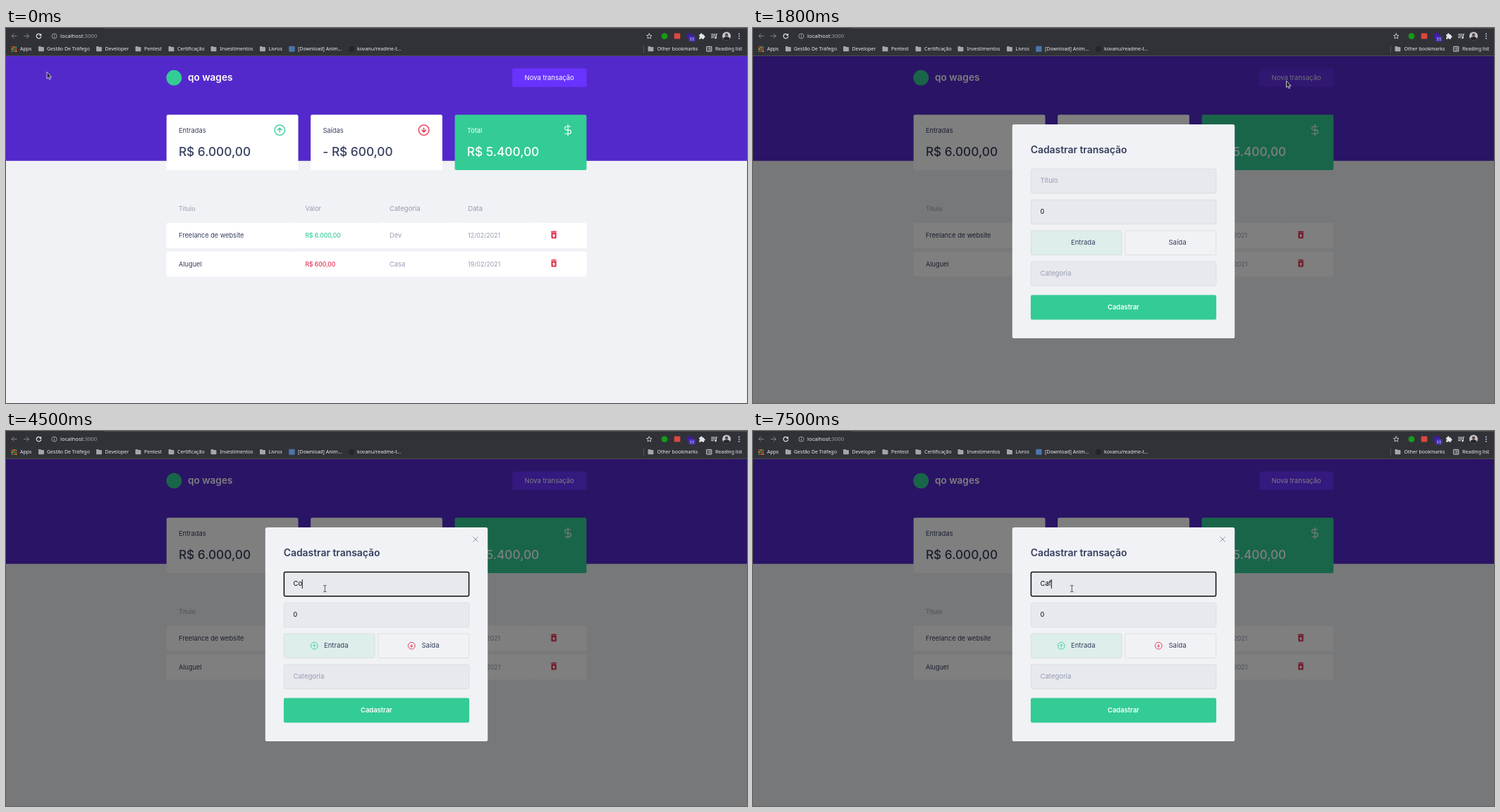
Write an HTML page that moves like this. It is 1051 px wide and 533 px high and loops after 8000 ms.

```html
<!DOCTYPE html>
<html lang="pt-BR">
<head>
<meta charset="utf-8">
<title>Finanças</title>
<style>
  html, body { margin: 0; width: 100%; height: 100%; overflow: hidden; background: #f0f2f5; }
  svg { display: block; width: 100vw; height: 100vh; font-family: Inter, sans-serif; }
  text { white-space: pre; }
  .chrome { font-family: "Noto Sans", sans-serif; }
  .line { fill: none; stroke-linecap: round; stroke-linejoin: round; }
</style>
</head>
<body>
<svg id="stage" viewBox="0 0 1051 533"></svg>
<script>
const PURPLE = '#5429cc', GREEN = '#33cc95', RED = '#e52e4d';
const TITLE = '#363f5f', MUTED = '#969cb3', PAPER = '#f0f2f5', ICON = '#e4e5e8';

const text = (x, y, size, fill, str, extra = '') =>
  `<text x="${x}" y="${y}" font-size="${size}" fill="${fill}" ${extra}>${str}</text>`;
const rect = (x, y, w, h, fill, r = 0, extra = '') =>
  `<rect x="${x}" y="${y}" width="${w}" height="${h}" rx="${r}" fill="${fill}" ${extra}/>`;
const circle = (x, y, r, fill, extra = '') =>
  `<circle cx="${x}" cy="${y}" r="${r}" fill="${fill}" ${extra}/>`;
const line = (d, stroke, width = 1, extra = '') =>
  `<path class="line" d="${d}" stroke="${stroke}" stroke-width="${width}" ${extra}/>`;
const group = (id, body, extra = '') => `<g id="${id}" ${extra}>${body}</g>`;

const SEMI = 'font-weight="600"', MEDIUM = 'font-weight="500"';

function arrowCircle(x, y, r, color, down) {
  const turn = down ? 180 : 0, k = r / 7.3;
  return `<g transform="translate(${x} ${y}) rotate(${turn}) scale(${k})">` +
    circle(0, 0, 7.3, 'none', `stroke="${color}" stroke-width="1.35"`) +
    line('M0 2.9V-2.9M-2.9 0L0 -2.9 2.9 0', color, 1.35) + '</g>';
}

const folder = (x) =>
  `<path d="M${x} 27q0-.9.9-.9h2.2l1 1h3q.8 0 .8.9v4.5q0 .8-.8.8h-6.2q-.9 0-.9-.8z" fill="#a4a6ab"/>`;

function toolbar() {
  const label = (x, str) => text(x, 32.4, 7, '#e8eaed', str);
  const folders = [
    [46, 58, 'Gestão De Tráfego'], [128, 140.5, 'Developer'], [183.5, 196, 'Pentest'],
    [230.5, 243, 'Certificação'], [290.5, 303.5, 'Investimentos'], [360, 372.5, 'Livros'],
    [910.5, 923.5, 'Other bookmarks'],
  ].map(([x, tx, str]) => folder(x) + label(tx, str)).join('');

  const appColors = ['#ea4335', '#f5a623', '#34a853'];
  let apps = '';
  for (let i = 0; i < 9; i++)
    apps += rect(7.7 + (i % 3) * 2.8, 26.3 + Math.floor(i / 3) * 2.8, 1.9, 1.9, appColors[(i + Math.floor(i / 3)) % 3]);

  return group('toolbar',
    rect(0, 0, 1051, 40, '#313238') + rect(139, 0, 912, 1, '#4b4c51') +
    rect(0, 39, 1051, 1, '#4b4c51') +
    line('M15 11.5H8.3M11.3 8.3L8.1 11.5l3.2 3.2M25.7 11.5h6.7M29.4 8.3l3.2 3.2-3.2 3.2', '#85878c', .95) +
    line('M49.2 9.6a3.3 3.3 0 1 0 .6 2.6', ICON, 1.2) +
    '<path d="M50.2 7.7v3.4h-3.4z" fill="#e4e5e8"/>' +
    circle(68.5, 11.6, 3.5, 'none', 'stroke="#b4b6ba" stroke-width=".8"') +
    line('M68.5 11.3v2M68.5 9.7v.1', '#b4b6ba', .8) +
    text(77, 14.3, 7.7, '#e8eaed', 'localhost<tspan fill="#9aa0a6">:3000</tspan>') +
    line('M912.3 7.9l1.1 2.4 2.6.3-2 1.8.6 2.6-2.3-1.3-2.3 1.3.6-2.6-2-1.8 2.6-.3z', ICON, .8) +
    circle(934, 11.7, 4.4, '#189a18') +
    rect(947.7, 7.6, 8.6, 8, '#d9483f', 1) +
    rect(965.5, 7.5, 8, 7.5, '#3d1d9c', 1) + rect(968.5, 11.5, 9, 7.7, '#4a33b8', 1.2) +
    text(973, 17.8, 6, '#fff', '11', 'text-anchor="middle"') +
    rect(983, 9.2, 7, 6.6, ICON, .8) + circle(986.2, 8.8, 1.4, ICON) + circle(990.1, 12.4, 1.4, ICON) +
    circle(983.2, 12.6, 1.1, '#313238') + circle(986.4, 15.7, 1.1, '#313238') +
    line('M1000.5 9h5.5M1000.5 11.3h5.5M1000.5 13.6h3M1007.3 14V8.8h1.4', ICON, 1) + circle(1006.3, 14, 1.2, ICON) +
    circle(1022, 11.6, 6, '#c8c9cc') +
    '<path d="M1017.2 15.2q1-3 4.8-3t4.8 3a6 6 0 0 1-9.6 0z" fill="#23242a"/>' + circle(1022, 9.7, 2.3, '#5c4a45') +
    [8.4, 11.6, 14.8].map(y => circle(1039.8, y, .9, ICON)).join('') +
    apps + label(20, 'Apps') + folders +
    rect(401.2, 25.7, 8.4, 8, '#4a76a8', 1) + label(414, '[Download] Anim...') +
    circle(490, 29.8, 4.1, '#24262b') + label(498, 'kovanu/readme-t...') +
    rect(904, 25, .8, 10, '#5b5d62') +
    rect(993.6, 26.4, 7.2, 6.8, 'none', .5, 'stroke="#e4e5e8" stroke-width=".9"') +
    line('M995.4 28.2h.1M995.4 29.8h.1M995.4 31.4h.1M997 28.2h2.3M997 29.8h2.3M997 31.4h2.3', ICON, .7) +
    label(1006, 'Reading list'),
    'class="chrome"');
}

function card(x, label, value, fill, ink) {
  return rect(x, 123.2, 186.8, 78.8, fill, 2.2) +
    text(x + 17.3, 148.5, 9.3, ink, label) +
    text(x + 17.2, 181.8, 17.3, ink, value, MEDIUM);
}

function row(y, name, amount, color, kind, date) {
  const edges = [227.5, 407, 526, 638, 751, 823.5];
  const cells = edges.slice(1).map((end, i) => rect(edges[i], y, end - edges[i], 36, '#fff', 2.2)).join('');
  const base = y + 21.3;
  return cells + text(245, base, 9.2, TITLE, name) + text(424.6, base, 8.5, color, amount, MEDIUM) +
    text(544, base, 9.3, MUTED, kind) + text(655.3, base, 8.75, MUTED, date) +
    `<path transform="translate(769.8 ${y + 9.6}) scale(.6)" fill="${RED}" d="M19 4h-3.5l-1-1h-5l-1 1H5v2h14zM6 7v12c0 1.1.9 2 2 2h8c1.1 0 2-.9 2-2V7zM14 14v4h-4v-4H8l4-4 4 4z"/>`;
}

function page() {
  return rect(0, 40, 1051, 493, PAPER) + rect(0, 40, 1051, 148.8, PURPLE) +
    circle(238.3, 70.7, 10.9, GREEN) + text(258, 75.2, 13.6, '#fff', 'qo wages', SEMI) +
    group('button', rect(718.2, 57.5, 105.3, 26.3, '#6933ff', 2.2) + text(735.6, 74, 9.45, '#fff', 'Nova transação')) +
    card(227.7, 'Entradas', 'R$ 6.000,00', '#fff', TITLE) + arrowCircle(388.2, 145.1, 7.3, GREEN) +
    card(432.1, 'Saídas', '- R$ 600,00', '#fff', TITLE) + arrowCircle(592.7, 145.1, 7.3, RED, true) +
    card(636.6, 'Total', 'R$ 5.400,00', GREEN, '#fff') +
    line('M12 1v22M17 5H9.5a3.5 3.5 0 0 0 0 7h5a3.5 3.5 0 0 1 0 7H6', '#fff', 1.5,
      'transform="translate(788.3 136.4) scale(.73)"') +
    text(245, 259.8, 8.9, MUTED, 'Título') + text(424.6, 259.8, 9.3, MUTED, 'Valor') +
    text(544, 259.8, 9.5, MUTED, 'Categoria') + text(655.3, 259.8, 9.6, MUTED, 'Data') +
    row(277, 'Freelance de website', 'R$ 6.000,00', GREEN, 'Dev', '12/02/2021') +
    row(317.4, 'Aluguel', 'R$ 600,00', RED, 'Casa', '19/02/2021');
}

function modal() {
  const border = 'stroke="#d7d7d7" stroke-width=".7"';
  const field = (y) => rect(394.3, y + .3, 262.6, 34.5, '#e7e9ee', 2.2, border);
  return group('modal',
    rect(0, 40, 1051, 493, '#000', 0, 'opacity=".5"') +
    rect(367.8, 137, 315.4, 304, PAPER, 2.6) +
    text(393.7, 177.7, 13.9, TITLE, 'Cadastrar transação', SEMI) +
    field(200) + field(244) + field(331.6) +
    rect(394.3, 288, 128.8, 34.6, '#ddeeeb', 2.2, border) + rect(527.8, 288, 129, 34.6, 'none', 2.2, border) +
    text(407.6, 264.3, 9, '#000', '0') +
    text(451, 308.1, 9.5, TITLE, 'Entrada') + text(589.4, 308.1, 9.6, TITLE, 'Saída') +
    text(407.6, 352.1, 9.5, MUTED, 'Categoria') +
    rect(393.9, 379.6, 263.2, 35, GREEN, 2.2) +
    text(525.4, 400.3, 9.4, '#fff', 'Cadastrar', SEMI + ' text-anchor="middle"') +
    group('icons', arrowCircle(437.2, 305.2, 4.9, GREEN) + arrowCircle(575.2, 305.2, 4.9, RED, true) +
      line('M662.6 150.5l6.8 6.8M669.4 150.5l-6.8 6.8', '#8f929c', 1)) +
    rect(394.4, 200.6, 262.2, 34.2, 'none', 2, 'id="focus" stroke="#101010" stroke-width="1.5"') +
    text(407.6, 220.3, 9.3, MUTED, 'Título', 'id="typed"') +
    rect(407.4, 211, .9, 13, '#000', 0, 'id="caret"'));
}

const pointers =
  group('arrow', '<path d="M0 0V9.6L2.2 7.7 3.7 11 5.2 10.3 3.8 7.1H6.6Z" fill="#25262a" stroke="#e8e8e8" stroke-width=".8"/>') +
  group('hand', '<path d="M-1.6.2Q-.9-1 .2 0L1.6 3.2 3 2.9 4.3 3.2 5.6 3.7 6.3 5.8 5.6 10.3H0L-3.5 6.5Q-3.7 5.3-2.4 5.4L-.6 6.3Z" fill="#25262a" stroke="#e8e8e8" stroke-width=".8"/>') +
  group('beam', line('M-1.9-4.4H-.5L0-4 .5-4.4H1.9M0-4V4M-1.9 4.4H-.5L0 4 .5 4.4H1.9', '#34353a', .8));

const stage = document.getElementById('stage');
stage.innerHTML = page() + modal() + toolbar() + group('pointer', pointers);
const $ = (id) => document.getElementById(id);
const show = (id, on) => $(id).setAttribute('visibility', on ? 'inherit' : 'hidden');

// [time, x, y, shape]
const moves = [
  [0, 58, 62.5, 'arrow'], [400, 78, 78, 'arrow'], [500, 132, 106, 'arrow'], [600, 212, 128, 'arrow'],
  [700, 320, 137, 'arrow'], [800, 440, 134, 'arrow'], [900, 560, 122, 'arrow'], [1000, 665, 102, 'arrow'],
  [1100, 745, 82, 'hand'], [1200, 794, 74.5, 'hand'], [1300, 756.5, 75.5, 'hand'], [1800, 756.5, 75, 'arrow'],
  [1900, 725, 95, 'arrow'], [2000, 630, 150, 'arrow'], [2100, 520, 208, 'beam'], [2200, 455, 223, 'beam'],
  [2400, 447, 224, 'beam'], [2600, 445.5, 224, 'beam'], [3100, 452.3, 224, 'beam'],
];
// [time, text, caret visible]
const typing = [
  [0, '', 0], [2400, '', 1], [3100, '', 0], [3700, '', 1], [4400, 'C', 1], [4500, 'Co', 1],
  [5200, 'Com', 1], [5800, 'Com', 0], [5900, 'Co', 0], [6100, '', 0], [6400, '', 1], [6900, '', 0],
  [7200, 'C', 1], [7400, 'Ca', 1], [7500, 'Caf', 1],
];
const at = (table, t) => table.findLast(step => step[0] <= t);

function draw(t) {
  const [, x, y, shape] = at(moves, t);
  $('pointer').setAttribute('transform', `translate(${x} ${y})`);
  for (const id of ['arrow', 'hand', 'beam']) show(id, id === shape);
  $('button').style.filter = t >= 1100 && t < 1900 ? 'brightness(.9)' : 'none';

  const open = t >= 1800;
  $('modal').style.display = open ? 'inline' : 'none';
  if (!open) return;
  show('icons', t >= 1900);
  show('focus', t >= 2400);
  const [, str, caret] = at(typing, t), typed = $('typed');
  typed.textContent = str || 'Título';
  typed.setAttribute('fill', str ? '#000' : MUTED);
  $('caret').setAttribute('x', 407.4 + (str ? typed.getComputedTextLength() : 0));
  show('caret', caret);
}

const start = performance.now();
function tick() {
  draw((performance.now() - start) % 8000);
  requestAnimationFrame(tick);
}
tick();
</script>
</body>
</html>
```
